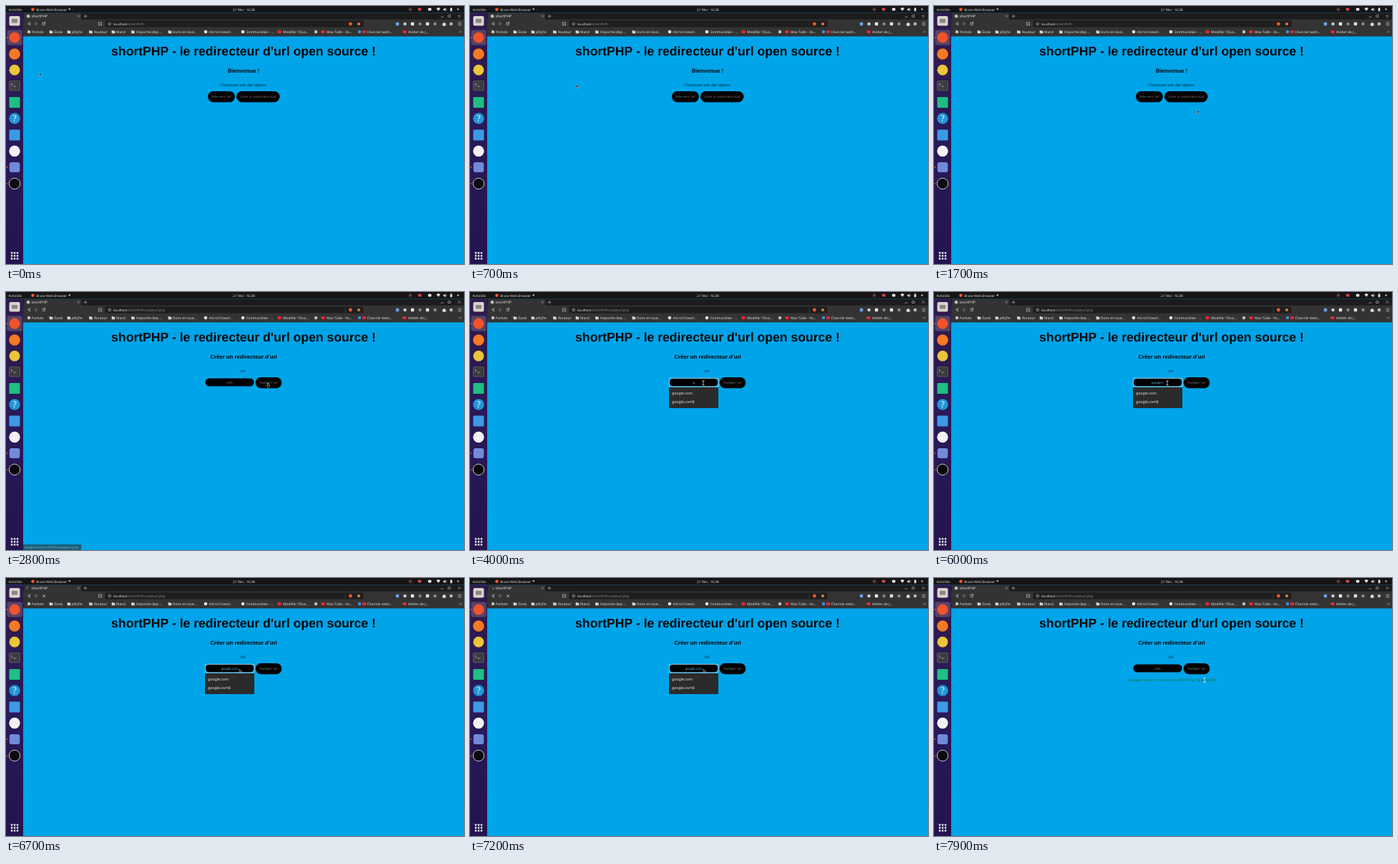
These frames come from a looping animation (640 by 360 pixels, 8000 ms). An HTML page:

```html
<!DOCTYPE html>
<html lang="fr">
<head>
<meta charset="utf-8">
<title>shortPHP</title>
<style>
html, body { margin: 0; width: 100%; height: 100%; overflow: hidden; background: #00a4e9; }
svg { display: block; width: 100vw; height: 100vh; }
text { white-space: pre; text-rendering: geometricPrecision; }
.ui { font-family: "Noto Sans", sans-serif; }
.page { font-family: "Liberation Sans", Arial, sans-serif; }
</style>
</head>
<body>
<svg id="stage" viewBox="0 0 640 360" xmlns="http://www.w3.org/2000/svg">
  <defs>
    <linearGradient id="dockFill" x1="0" y1="0" x2="0" y2="1">
      <stop offset="0" stop-color="#2f1a4b"/>
      <stop offset=".5" stop-color="#291a5a"/>
      <stop offset="1" stop-color="#24134f"/>
    </linearGradient>
  </defs>
</svg>
<script>
const NS = "http://www.w3.org/2000/svg";
const stage = document.getElementById("stage");
const LOOP = 8000;

function add(parent, tag, attrs, content) {
  const el = document.createElementNS(NS, tag);
  for (const k in attrs) el.setAttribute(k, attrs[k]);
  if (content !== undefined) el.textContent = content;
  parent.appendChild(el);
  return el;
}
const group = (p, attrs = {}) => add(p, "g", attrs);
const rect = (p, x, y, width, height, fill, rx = 0, extra = {}) =>
  add(p, "rect", { x, y, width, height, fill, rx, ...extra });
const disc = (p, cx, cy, r, fill, extra = {}) => add(p, "circle", { cx, cy, r, fill, ...extra });
const line = (p, d, stroke = "#c9c9c9", w = 0.8) =>
  add(p, "path", { d, fill: "none", stroke, "stroke-width": w, "stroke-linecap": "round", "stroke-linejoin": "round" });
const shape = (p, d, fill, extra = {}) => add(p, "path", { d, fill, ...extra });
const label = (p, x, y, str, size, fill, extra = {}) =>
  add(p, "text", { x, y, "font-size": size, fill, ...extra }, str);
const show = (el, on) => el.setAttribute("visibility", on ? "visible" : "hidden");

// Window chrome
const ui = group(stage, { class: "ui" });
rect(ui, 24, 42, 616, 318, "#00a4e9");

function topBar() {
  rect(ui, 0, 0, 640, 9.5, "#151515");
  label(ui, 3.5, 6.6, "Activités", 4.8, "#dcdcdc");
  disc(ui, 37.5, 4.7, 2.3, "#f1562b");
  label(ui, 42.3, 6.6, "Brave Web Browser", 4.7, "#dcdcdc");
  shape(ui, "M87 3.6h3.4l-1.7 2.4z", "#cfcfcf");
  label(ui, 317, 6.6, "21 févr.  16:38", 4.8, "#dcdcdc");
  disc(ui, 565, 4.8, 2.3, "none", { stroke: "#8b2a33", "stroke-width": 0.9 });
  disc(ui, 565, 4.8, 0.8, "#d0d0d0");
  rect(ui, 575.8, 2.8, 4.5, 3.8, "#d8434f", 1);
  rect(ui, 589.8, 2.8, 4.6, 3.8, "#e4e4e4", 1);
  shape(ui, "M601.5 3.2q2.7 -2 5.4 0l-2.7 3.9z", "#e4e4e4");
  shape(ui, "M611 4h1.4l1.7 -1.5v4.8l-1.7 -1.5H611z", "#e4e4e4");
  line(ui, "M615.2 3.5q1 1.3 0 2.6", "#e4e4e4", 0.6);
  rect(ui, 620.8, 2.6, 2.6, 4.6, "#e4e4e4", 0.5);
  shape(ui, "M630 3.7h3.4l-1.7 2.3z", "#e4e4e4");
}

function globe(p, x, y, r = 2.2) {
  disc(p, x, y, r, "#dfe1e3");
  line(p, `M${x - r * 0.7} ${y - 0.5}l1.2 .8l.5 1M${x + 0.3} ${y - r * 0.7}l1 1`, "#585858", 0.7);
}

function tabBar() {
  rect(ui, 24, 9.5, 616, 9.5, "#1c1c1c");
  shape(ui, "M25 19V11.5q0 -1.5 1.5 -1.5H103.5q1.5 0 1.5 1.5V19z", "#333");
  label(ui, 35.5, 15.9, "shortPHP", 5.1, "#e4e4e4");
  line(ui, "M100 12.9l2.6 2.6m0 -2.6l-2.6 2.6", "#b5b5b5", 0.6);
  line(ui, "M109 14.2h4M111 12.2v4", "#b5b5b5", 0.7);
  line(ui, "M608 15.2h3M618.2 12.7h2.8v2.8h-2.8zM632 12.7l2.8 2.8m0 -2.8l-2.8 2.8", "#c9c9c9", 0.6);
}

function toolBar() {
  rect(ui, 24, 18.7, 616, 23.7, "#333");
  line(ui, "M33.6 23.1v3.8l-3 -1.9z", "#c9c9c9", 0.7);
  line(ui, "M40.9 23.1v3.8l3 -1.9z", "#858585", 0.7);
  line(ui, "M130 23h3.6v4.2l-1.8 -1.4l-1.8 1.4z", "#c9c9c9", 0.7);
  rect(ui, 138.5, 20.3, 361, 9.3, "#1e1e1e", 1.5);
  disc(ui, 144.7, 25, 1.9, "none", { stroke: "#c4c4c4", "stroke-width": 0.6 });
  line(ui, "M144.7 24.8v1M144.7 23.9v.05", "#c4c4c4", 0.5);
  line(ui, "M474 21.5v7", "#474747", 0.5);
  disc(ui, 481.3, 25, 2.4, "#f1562b");
  disc(ui, 493, 25, 2.1, "#dd7b5a");
  const tools = ["#6f9fe0", "#b9d3ee", "#e8e8e8", "#858585", "#e0e0e0", "#8d8d8d"];
  tools.forEach((c, i) => {
    const x = 547 + i * 10.5;
    if (i % 2) disc(ui, x, 25, 2.2, c);
    else rect(ui, x - 2.2, 22.8, 4.4, 4.4, c, 0.8);
  });
  shape(ui, "M610 24h1.6v-1.2h1.5v1.2h1.5v3.8H610z", "#d8d8d8");
  disc(ui, 622, 25, 2.3, "#b6b8bb");
  line(ui, "M632 23.2h4M632 25h4M632 26.8h4", "#d0d0d0", 0.6);
}

function bookmarks() {
  const red = "#e52932", white = "#e8e8e8";
  const items = [
    [32, 36, "Parlote", "globe"], [63, 67.3, "École", "folder"],
    [88, 92, "Jellyfin", "folder"], [118.5, 123, "Routeur", "folder"],
    [150, 154, "Marol", "folder"], [177.5, 182, "Importés dep...", "folder"],
    [229, 233, "Dons en tout...", "folder"], [279, 283.5, "mirrorCrew/r...", white],
    [331, 335.5, "Communities - ...", white], [382, 387, "Modifier l'illus...", red],
    [433, 438, "", "globe"], [443, 448, "Max Tulle - Vo...", red],
    [494, 498, "", "#3f8fd8"], [500.5, 504.5, "Channel switc...", red],
    [557, 562, "Atelier de J...", red]
  ];
  for (const [x, tx, str, icon] of items) {
    if (icon === "globe") globe(ui, x, 36);
    else if (icon === "folder") shape(ui, `M${x - 2.3} 34h1.7l.7 .8h2.2v3.4h-4.6z`, "#d4d4d4");
    else if (icon === red) rect(ui, x - 2.5, 33.9, 5, 4, icon, 0.7);
    else disc(ui, x, 36, 2.3, icon);
    label(ui, tx, 37.8, str, 4.9, "#e2e2e2");
  }
  line(ui, "M633.5 34.8l1.2 1.2l-1.2 1.2M635.5 34.8l1.2 1.2l-1.2 1.2", "#c9c9c9", 0.5);
}

function dock() {
  rect(ui, 0, 9.5, 24, 350.5, "url(#dockFill)");
  rect(ui, 1.5, 33.5, 21, 21, "#554469", 2);
  rect(ui, 4.5, 14, 15, 13.5, "#d7d3cd", 2);
  rect(ui, 8, 18, 8, 5.5, "#8a8580", 1);
  disc(ui, 12, 44, 7.5, "#f1532c");
  disc(ui, 12, 67, 7.8, "#f47a24");
  disc(ui, 12, 89.3, 7.5, "#e8c53a");
  rect(ui, 4.5, 104.5, 15, 13.5, "#3b3d40", 1.5, { stroke: "#666", "stroke-width": 0.7 });
  line(ui, "M7 108l2 1.6l-2 1.6M10.5 112h3", "#c3c3c3", 0.7);
  rect(ui, 4.5, 127, 15, 15, "#1fbf83", 1);
  disc(ui, 12, 157, 7.7, "#2296d8");
  label(ui, 12, 161.3, "?", 12, "#fff", { "text-anchor": "middle" });
  rect(ui, 4.5, 172.5, 15, 15, "#3a9ae2", 1);
  disc(ui, 12, 202.5, 7.7, "#f2f2f4");
  rect(ui, 4.8, 218, 14.5, 14, "#7289da", 3);
  disc(ui, 12, 247.8, 7.7, "#08080a", { stroke: "#dadada", "stroke-width": 0.9 });
  for (const y of [44, 225, 248]) disc(ui, 1.5, y, 0.9, "#e95420");
  for (let i = 0; i < 9; i++)
    rect(ui, 6.8 + (i % 3) * 4, 343.3 + Math.floor(i / 3) * 4, 2.5, 2.5, "#eee", 0.5);
}

topBar();
tabBar();
toolBar();
bookmarks();
dock();

const tabGlobe = group(ui);
globe(tabGlobe, 31, 14.3);
const spinner = line(ui, "M31 12.3a2 2 0 0 1 2 2", "#b9c6d6", 0.7);
const reload = line(ui, "M54.4 23.7a2 2 0 1 0 .3 1.7M54.7 22.6v1.5h-1.5");
const stop = line(ui, "M51.3 23.3l3.4 3.4m0 -3.4l-3.4 3.4");
const address = label(ui, 150, 26.7, "", 4.6, "#8c8c8c");
add(address, "tspan", { fill: "#e6e6e6" }, "localhost");
const path = add(address, "tspan", {}, "");

// Web page
const page = group(stage, { class: "page" });
const centred = (p, x, y, str, size, fill, extra) =>
  label(p, x, y, str, size, fill, { "text-anchor": "middle", ...extra });
const bold = { "font-weight": 700 }, slant = { "font-style": "italic" };
const ink = "#05080a", soft = "#04283a";

function button(p, x, w, str) {
  rect(p, x, 119, w, 15.2, "#000", 7.6);
  centred(p, x + w / 2, 128, str, 4.5, "#7a7c78", slant);
}

centred(page, 332, 69.1, "shortPHP - le redirecteur d'url open source !", 17.62, ink, bold);

const home = group(page);
centred(home, 332, 93.3, "Bienvenue !", 7.75, ink, bold);
centred(home, 331.5, 111.6, "Choisissez une des options", 5.33, soft, slant);
button(home, 282, 38, "Aller vers l'url");
button(home, 322, 60.5, "Créer un redirecteur d'url");

const form = group(page);
centred(form, 332, 93.3, "Créer un redirecteur d'url", 7.75, ink, bold);
centred(form, 331, 111.6, "Url", 5.33, soft, slant);
rect(form, 278.5, 120.5, 68, 11, "#000", 5.5);
button(form, 348.7, 36.6, "Partager l'url");
const entry = centred(form, 312.7, 127.8, "", 4.6, "#777");

const focus = rect(form, 278.4, 120.4, 68.6, 11.8, "none", 1.5, { stroke: "#dfe6ea", "stroke-width": 0.7 });

const list = group(form, { class: "ui" });
rect(list, 278, 133, 69, 29, "#2b2b2b", 0.5);
label(list, 282, 143, "google.com", 5.2, "#ededed");
label(list, 282, 155, "google.com$", 5.2, "#ededed");

const result = centred(page, 332, 143.7, "Partagez ce lien : localhost/shortPHP/?url=gU2Tq8Rd", 5.1, "#17763f", slant);

const status = group(stage, { class: "ui" });
rect(status, 24, 352.3, 81, 7.7, "#2c2c2c", 0.5);
label(status, 26, 357.7, "localhost/shortPHP/createurl.php", 4.8, "#c8c8c8");

// Pointers, with the hot spot at 0,0
const outline = { stroke: "#e8e8e8", "stroke-width": 0.45, "stroke-linejoin": "round" };
const pointers = {
  arrow: shape(stage, "M0 0v4.8l1.1 -1l.8 1.7l.9 -.4l-.8 -1.7h1.5z", "#111", outline),
  hand: shape(stage, "M-.5 0h1v2l2 .5v2l-.6 1.3h-2.5l-1.6 -2.2l.5 -.5l1.2 .7z", "#111", outline),
  beam: line(stage, "M-1.2 -2.8h2.4M0 -2.8v5.6M-1.2 2.8h2.4", "#f0f0f0", 0.7)
};

// Timeline
const clickLink = 2650, focusAt = 3450, sendAt = 6500, doneAt = 7250;
const keys = [3900, 4200, 4450, 4680, 4880, 5080, 5750, 5950, 6150, 6350];
const moves = [
  [0, 46.5, 93], [250, 46.5, 93], [1450, 367.7, 145.2], [1750, 367.7, 145.2],
  [2250, 366, 127], [2850, 366, 127], [3300, 326, 127], [7250, 326, 127],
  [7800, 378, 142.5], [8000, 378, 142.5]
];
const clamp = u => Math.max(0, Math.min(1, u));
const ease = u => u * u * (3 - 2 * u);

function pointerAt(t) {
  const i = moves.findIndex(m => m[0] > t);
  const [t0, x0, y0] = moves[i - 1], [t1, x1, y1] = moves[i];
  const u = ease((t - t0) / (t1 - t0));
  return [x0 + (x1 - x0) * u, y0 + (y1 - y0) * u];
}

function pointerKind(t, x, y) {
  if (t >= sendAt && t < doneAt) return "arrow";
  if (t >= doneAt) return y > 138 ? "beam" : "arrow";
  if (y < 119 || y > 134) return "arrow";
  if (x > 348 && x < 385) return "hand";
  return x > 278 && x < 347 ? "beam" : "arrow";
}

function draw(t) {
  const created = t >= clickLink, loading = t >= sendAt && t < doneAt, done = t >= doneAt;
  const typed = done ? 0 : keys.filter(k => k <= t).length;
  show(home, !created);
  show(form, created);
  show(focus, t >= focusAt && !done);
  show(list, typed > 0);
  show(result, done);
  status.setAttribute("opacity", Math.min(clamp((t - 2150) / 100), clamp((2920 - t) / 200)));
  show(tabGlobe, !loading);
  show(spinner, loading);
  show(reload, !loading);
  show(stop, loading);
  spinner.setAttribute("transform", `rotate(${t * 0.36} 31 14.3)`);
  path.textContent = created ? "/shortPHP/createurl.php" : "/shortPHP/";
  entry.textContent = typed ? "google.com".slice(0, typed) : "URL";
  entry.setAttribute("fill", typed ? "#62a5c2" : "#777");

  const [x, y] = pointerAt(t), kind = pointerKind(t, x, y);
  for (const k in pointers) {
    show(pointers[k], k === kind);
    pointers[k].setAttribute("transform", `translate(${x} ${y})`);
  }
}

const start = performance.now();
function tick() {
  draw((performance.now() - start) % LOOP);
  requestAnimationFrame(tick);
}
tick();
</script>
</body>
</html>
```
